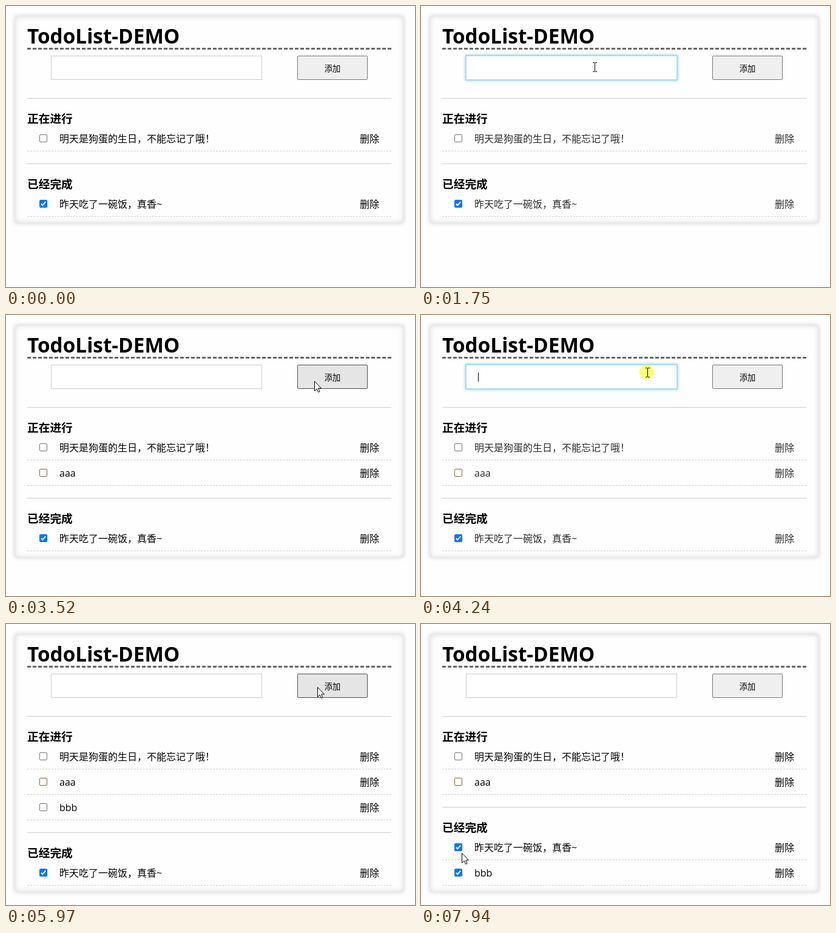
An HTML page for the animation above (8 s loop, 674 by 464 pixels).

```html
<!DOCTYPE html>
<html lang="zh-CN">
<head>
<meta charset="utf-8">
<title>TodoList-DEMO</title>
<style>
  html, body { margin: 0; width: 100%; height: 100%; overflow: hidden; background: #fefefe; }
  body { position: relative; color: #000; font: 16px "Open Sans", "Noto Sans CJK SC", "Noto Sans CJK", sans-serif; }
  body * { position: absolute; box-sizing: border-box; margin: 0; white-space: nowrap; }
  #card { left: 15px; top: 17px; width: 640px;
    box-shadow: 0 0 8px rgba(0, 0, 0, .2), inset 0 0 10px rgba(0, 0, 0, .15); }
  h1 { left: 35px; top: 26px; font-size: 33.35px; line-height: 46px; }
  #rule { left: 35px; top: 69px; width: 600px; border-top: 3px dashed #666; }
  #field { left: 74px; top: 82px; width: 348px; height: 40px; border: 1px solid #ccc; background: #fff; }
  .editing #field { border-color: #b5e0f0; box-shadow: 0 0 0 1px #a0d7ec, 0 0 5px 1px #87ceeb; }
  #value { left: 94px; top: 95px; height: 15px; border-right: 1px solid transparent;
    font: 13px/15px "Liberation Sans", sans-serif; }
  #value.caret { border-color: #000; }
  #add { left: 480px; top: 82px; width: 116px; height: 40px; border: 1px solid #767676; border-radius: 2px;
    background: #efefef; font-size: 13.333px; line-height: 40px; text-align: center; }
  #add.hover { border-color: #4f4f4f; background: #e5e5e5; }
  #add.pressed { border-color: #8d8d8d; background: #f5f5f5; }
  section { left: 35px; width: 600px; border-top: 1px solid #ccc; }
  h3 { top: 18px; font-size: 18.72px; line-height: 30px; }
  .row { left: 35px; width: 600px; height: 42px; border-bottom: 1px dashed #ccc; line-height: 43px; }
  .editing .row { color: #2b2b2b; }
  .label { left: 53px; }
  .remove { right: 20px; }
  .box { left: 20px; top: 14px; width: 13px; height: 13px; fill: #fff; stroke: #767676; }
  .box path { fill: none; stroke: none; stroke-width: 2; }
  .box.hover { stroke: #4f4f4f; }
  .box.checked { fill: #0075ff; stroke: #0075ff; }
  .box.checked.hover { fill: #005cc8; stroke: #005cc8; }
  .box.checked path { stroke: #fff; }
  #pointer { left: 0; top: 0; overflow: visible; width: 1px; height: 1px; }
</style>
</head>
<body>
<div id="card"></div>
<h1>TodoList-DEMO</h1>
<div id="rule"></div>
<div id="field"></div>
<div id="value"></div>
<div id="add">添加</div>
<section style="top:152px"><h3>正在进行</h3></section>
<section id="done"><h3>已经完成</h3></section>
<svg id="pointer">
  <circle id="click" cx="-1.5" cy="-1" r="12" fill="#ff0" fill-opacity=".52"/>
  <path id="arrow" d="M.5 .5V16.5L4.2 13 6.6 18.5 9 17.5 6.7 12H11.6Z" fill="#fff" stroke="#000"/>
  <path id="beam" d="M-3 -7.5H0M1 -7.5H4M.5 -7V7M-3 7.5H0M1 7.5H4" fill="none" stroke="#000"/>
</svg>
<script>
  const LOOP = 8000, ROW = 42;
  const ADD_A = 3520, ADD_B = 5970, FINISH_B = 7460;

  // start, end, steps, target x, target y
  const moves = [
    [650, 1060, 6, 286, 101],
    [2980, 3230, 4, 484, 125],
    [3310, 3390, 2, 508, 109],
    [4010, 4170, 3, 373, 95],
    [5420, 5650, 4, 513, 104],
    [6290, 6820, 8, 70, 295],
    [7000, 7150, 3, 64, 304],
    [7690, 7940, 4, 67, 378]
  ];
  const clicks = [[1210, 1270], [3450, ADD_A], [4240, 4400], [5890, ADD_B], [7370, FINISH_B]];
  const focused = [[1210, 3450], [4240, 5890]];
  const caretOn = [[1210, 1750], [2300, 3200], [4240, 4840], [4950, 5820]];
  const typed = [[0, ''], [2440, 'a'], [2530, 'aa'], [2680, 'aaa'], [ADD_A, ''],
    [4950, 'b'], [5180, 'bb'], [5270, 'bbb'], [ADD_B, '']];

  const $ = id => document.getElementById(id);
  const during = (spans, t) => spans.some(([from, to]) => t >= from && t < to);
  const inside = (p, x, y, w, h) => p.x >= x && p.x < x + w && p.y >= y && p.y < y + h;
  const show = (el, on) => { el.style.display = on ? '' : 'none'; };

  function makeRow(text) {
    const el = document.createElement('div');
    el.className = 'row';
    el.innerHTML = `<svg class="box"><rect x=".5" y=".5" width="12" height="12" rx="1.5"/>
      <path d="M2.8 6.7L5.3 9.2 10.2 3.4"/></svg><span class="label">${text}</span><span class="remove">删除</span>`;
    document.body.insertBefore(el, $('pointer'));
    return { el, box: el.querySelector('.box') };
  }

  const birthday = makeRow('明天是狗蛋的生日，不能忘记了哦！');
  const dinner = makeRow('昨天吃了一碗饭，真香~');
  const rowA = makeRow('aaa');
  const rowB = makeRow('bbb');
  rowA.box.style.stroke = '#7b6d35';

  function pointerAt(t) {
    const p = { x: 537, y: 391 };
    for (const [start, end, steps, x, y] of moves) {
      if (t < start) break;
      const step = Math.floor((t - start) / (end - start) * (steps - 1) + 1.001);
      const k = Math.min(1, step / steps);
      const eased = k * (2 - k);
      p.x += (x - p.x) * eased;
      p.y += (y - p.y) * eased;
    }
    return { x: Math.round(p.x), y: Math.round(p.y) };
  }

  function placeRow({ el, box }, top, checked, p) {
    el.style.top = top + 'px';
    box.classList.toggle('checked', checked);
    box.classList.toggle('hover', inside(p, 55, top + 14, 13, 13));
  }

  function render(t) {
    const p = pointerAt(t), visible = t >= 570, pressed = during(clicks, t);
    const hasA = t >= ADD_A, hasB = t >= ADD_B, doneB = t >= FINISH_B;
    const active = 1 + hasA + (hasB && !doneB);
    const doneTop = 218 + ROW * active;

    $('card').style.height = 341 + ROW * (hasA + hasB) + 'px';
    $('done').style.top = doneTop + 'px';
    show(rowA.el, hasA);
    show(rowB.el, hasB);
    placeRow(birthday, 198, false, p);
    placeRow(rowA, 198 + ROW, false, p);
    placeRow(dinner, doneTop + 46, true, p);
    placeRow(rowB, doneB ? doneTop + 46 + ROW : 198 + 2 * ROW, doneB, p);

    document.body.classList.toggle('editing', during(focused, t));
    $('value').textContent = typed.filter(([from]) => t >= from).pop()[1];
    $('value').classList.toggle('caret', during(caretOn, t));

    const overAdd = inside(p, 480, 82, 116, 40), overField = inside(p, 74, 82, 348, 40);
    $('add').classList.toggle('hover', overAdd);
    $('add').classList.toggle('pressed', overAdd && pressed);
    show($('pointer'), visible);
    show($('click'), pressed);
    show($('beam'), overField);
    show($('arrow'), !overField);
    $('pointer').style.transform = `translate(${p.x}px, ${p.y}px)`;
  }

  const started = performance.now();
  function tick() {
    render((performance.now() - started) % LOOP);
    requestAnimationFrame(tick);
  }
  tick();
</script>
</body>
</html>
```
